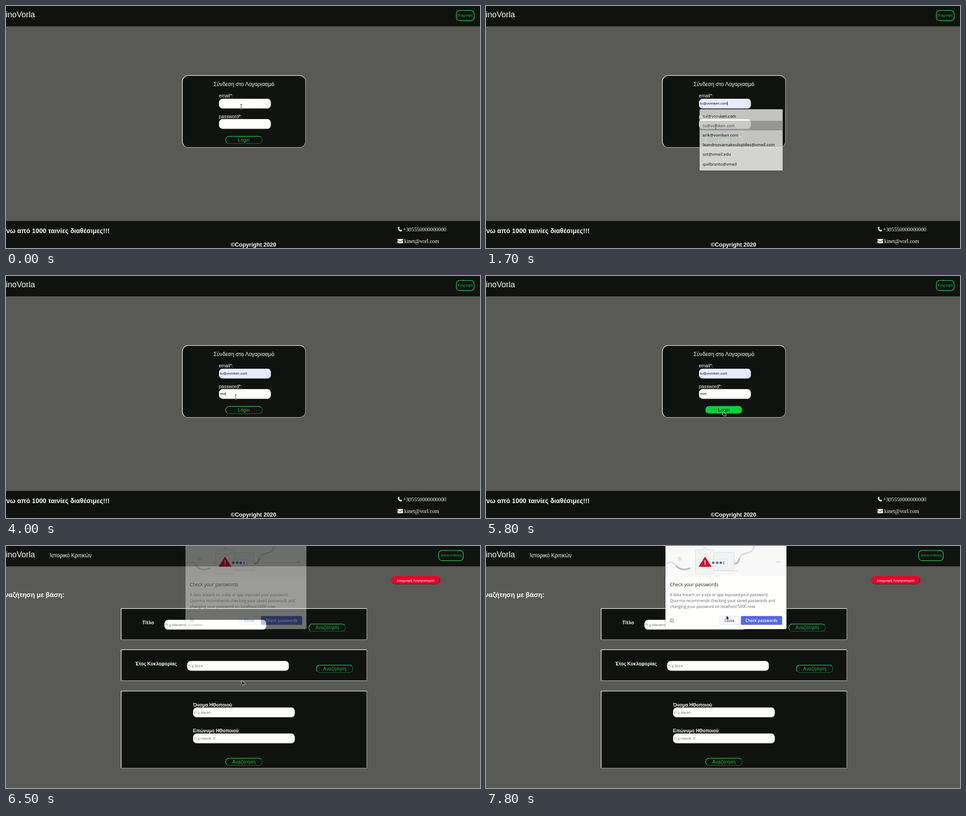
An HTML page for the animation above (8 s loop, 1046 by 535 pixels).

```html
<!DOCTYPE html>
<html lang="el">
<head>
<meta charset="utf-8">
<title>Login</title>
<style>
html, body { margin: 0; width: 100%; height: 100%; overflow: hidden; background: #595955; }
svg { display: block; width: 100%; height: 100%; }
text { font-family: "Liberation Sans", Arial, sans-serif; white-space: pre; }
.serif { font-family: "Liberation Serif", serif; }
.ui { font-family: "Open Sans", "Noto Sans", sans-serif; }
.bold { font-weight: 700; }
.semi { font-weight: 600; }
</style>
</head>
<body>
<svg id="stage" viewBox="0 0 1046 535"></svg>
<script>
const LOOP = 8000, STEP = 100;
const DARK = '#0f120f', PAPER = '#fffffc', PALE = '#fbfbf8', GREEN = '#20b545', SHADE = '#0d5a22';
const AUTO = '#e7edfb', GREY = '#a2a2a0';
const EMAIL = 'tu@vomken.com';
const ACCOUNTS = ['tul@vomken.com', EMAIL, 'erik@vomken.com',
  'leandrosvarnakoulopides@vmeil.com', 'ozt@vmeil.edu', 'quilbranto@vmeil'];

const text = (x, y, size, str, fill = PALE, cls = '', anchor = 'start') =>
  `<text x="${x}" y="${y}" font-size="${size}" fill="${fill}" class="${cls}" text-anchor="${anchor}">${str}</text>`;
const rect = (x, y, w, h, fill, extra = '') =>
  `<rect x="${x}" y="${y}" width="${w}" height="${h}" fill="${fill}" ${extra}/>`;
const line = (d, stroke, width, extra = '') =>
  `<path d="${d}" fill="none" stroke="${stroke}" stroke-width="${width}" ${extra}/>`;
const group = (id, body, extra = '') => `<g id="${id}" ${extra}>${body}</g>`;

// Rounded box with an outset border: light on top and left, dark on bottom and right
function outset(x, y, w, h, r, fill, light, dark, sw = 1.3) {
  const l = x + sw / 2, t = y + sw / 2, R = x + w - sw / 2, b = y + h - sw / 2;
  const k = r * (1 - Math.SQRT1_2);
  const arc = (px, py) => `A${r},${r} 0 0 1 ${px},${py}`;
  const upper = `M${l + k},${b - k}${arc(l, b - r)}V${t + r}${arc(l + r, t)}H${R - r}${arc(R - k, t + k)}`;
  const lower = `M${R - k},${t + k}${arc(R, t + r)}V${b - r}${arc(R - r, b)}H${l + r}${arc(l + k, b - k)}`;
  return rect(l, t, w - sw, h - sw, fill, `rx="${r}"`) + line(upper, light, sw) + line(lower, dark, sw);
}

const input = (x, y, w, fill = PAPER, hint = '') =>
  outset(x, y, w, 22, 7.5, fill, fill, GREY) + text(x + 2.4, y + 13.4, 7.95, hint, '#757575');
const button = (x, y, label, fill = DARK, ink = GREEN, edge = GREEN) =>
  outset(x, y, 82, 17.6, 7.5, fill, edge, SHADE, 1.5) + text(x + 41, y + 12.3, 10.65, label, ink, '', 'middle');
const navButton = (x, w, label) =>
  rect(x + .8, 9.8, w - 1.6, 22.6, DARK, `rx="7.5" stroke="${GREEN}" stroke-width="1.6"`) +
  text(x + w / 2, 23.3, 7.95, label, GREEN, '', 'middle');
const panel = (y, h) => outset(253.5, y, 543.5, h, 0, DARK, PALE, GREY);
const label = (x, y, str) => text(x, y, 10.25, str, PALE, 'bold');

function loginPage() {
  const icons =
    `<path d="M865.3,488.6l2-.5 1.3,3-1.3,1.2q1,2.1 3,3.1l1.3-1.4 2.1,1.5 -.4,2q-1.1,1.3-2.8,.9q-5-1.8-6-7.2q-.1-1.7,.8-2.6z" fill="${PALE}"/>` +
    rect(864, 515, 12, 9.6, PALE, 'rx="1"') + line('M864,517.6L870,521.6L876,517.6', DARK, .9);
  return navButton(993, 41, 'Εγγραφή') +
    rect(0, 475.3, 1046, 60, DARK) +
    text(228.5, 501.8, 14.3, 'Πάνω από 1000 ταινίες διαθέσιμες!!!', PALE, 'bold', 'end') +
    text(546, 532.2, 12.65, '©Copyright 2020', PALE, 'bold', 'middle') + icons +
    text(876, 498, 11.85, '+305550000000000', PALE, 'serif') +
    text(878.6, 524, 11.85, 'kinet@vorl.com', PALE, 'serif') +
    outset(388.6, 153, 273, 160.4, 13, DARK, PALE, GREY) +
    text(525, 177.2, 11.85, 'Σύνδεση στο Λογαριασμό', PALE, '', 'middle') +
    text(469.8, 202.3, 10.3, 'email*:') + text(469.8, 247.5, 10.3, 'password*:') +
    input(470, 205, 115) + group('filled', input(470, 205, 115, AUTO)) +
    text(472.4, 218.3, 7.97, '', '#111').replace('<text', '<text id="email"') +
    input(470, 250, 115) + group('dots', '') +
    group('idle', button(484, 287.5, 'Login')) +
    group('hover', button(484, 287.5, 'Login', '#0dcf40', DARK, '#0dcf40')) +
    rect(0, 0, .9, 9, '#222', 'id="caret"') + dropdown();
}

function dropdown() {
  const rows = ACCOUNTS.map((name, i) =>
    text(478, 246.8 + i * 21.15, 8.8, name, '#333', 'ui semi')).join('');
  return group('drop', rect(470.5, 227.5, 185, 137.5, '#000', 'opacity=".25" rx="2"') +
    rect(471.3, 228.2, 183.4, 135.6, '#f6f6f4', 'rx="1.5"') +
    rect(471.3, 0, 183.4, 21.2, '#bbbbb9', 'id="mark"') + rows);
}

function searchPage() {
  return text(97, 25.3, 11.85, 'Ιστορικό Κριτικών') + navButton(954, 56, 'Αποσύνδεση') +
    outset(849.6, 66.2, 108.6, 18.2, 8, '#e4062c', '#ea0a30', '#8d0a20') +
    text(904, 78.6, 7.95, 'Διαγραφή Λογαριασμού', PALE, '', 'middle') +
    text(129, 113, 14.5, 'Αναζήτηση με βάση:', PALE, 'bold', 'end') +
    panel(137.8, 70) + label(301, 172.6, 'Τίτλο') +
    input(349.7, 163.3, 225, PAPER, 'Π.χ Wardens: Duskfold') + button(667.6, 171.7, 'Αναζήτηση') +
    panel(228.8, 69.6) + label(284.4, 263.6, 'Έτος Κυκλοφορίας') +
    input(399.7, 254.2, 225, PAPER, 'Π.χ 2019') + button(684.3, 262.7, 'Αναζήτηση') +
    panel(320, 172) + label(412.8, 354.6, 'Όνομα ΗΘοποιού') +
    input(412.8, 357.1, 225, PAPER, 'Π.χ Martin') + label(412.8, 412.2, 'Επώνυμο ΗΘοποιού') +
    input(412.8, 414.6, 225, PAPER, 'Π.χ Halvek Jr.') + button(484, 468.4, 'Αναζήτηση') +
    group('dialog', dialog());
}

// Asterisk made of three crossing strokes
const star = (x, y, r, color, width) => [90, 30, 150].map(a => {
  const dx = r * Math.cos(a * Math.PI / 180), dy = r * Math.sin(a * Math.PI / 180);
  return line(`M${x - dx},${y - dy}L${x + dx},${y + dy}`, color, width);
}).join('');

function dialog() {
  const soft = '#dcdee0', blue = '#4048c4', body = '#5f6368';
  const art = rect(396, 0, 267, 68, '#f8f9f8') +
    line('M396,40C408,32 414,36 420,44S438,54 451,49', soft, 3.4) +
    line('M420,44C426,52 438,54 451,49', '#b9bdc0', 3.4) +
    line('M548,39C562,42 556,20 570,17S588,14 592,0', soft, 3.4) +
    line('M548,39C556,40 557,32 559,27', '#b9bdc0', 3.4) +
    star(427, 28.5, 6, soft, 2) +
    `<path d="M640,37.5q0-4 3-4 2-2.400 4,0 3,0 3,4z" fill="${soft}"/>` +
    rect(490, 14, 57.500, 39, '#f1f3f4', `rx="2" stroke="${soft}"`) + line('M503,55H556', soft, 1.3) +
    rect(462.5, 7.5, 40.5, 54.5, '#f4f5f5', `rx="3.500" stroke="${soft}"`) +
    rect(470, 10, 27, 7, '#fafafa', `rx="2" stroke="${soft}"`) +
    `<circle cx="483.400" cy="7.500" r="5" fill="#f4f5f5" stroke="${soft}"/><circle cx="483.400" cy="6.500" r="1.700" fill="${soft}"/>` +
    rect(491, 29.5, 40.5, 15, '#fdfdfd', `rx="1.500" stroke="${soft}"`) +
    [501.5, 510, 518].map(x => star(x, 37, 3.4, blue, 1.4)).join('') + line('M525,33.5V41', blue, 1.4) +
    '<path d="M483.400,23.500L498,46H469z" fill="#d80a2c"/>' +
    line('M483.400,31.500V39', '#fff', 1.8) + rect(482.5, 40.4, 1.8, 1.8, '#fff');
  return rect(394.5, -4, 270, 189.5, '#000', 'opacity=".16" rx="3"') +
    rect(396, -4, 267, 187.8, '#fffffd', 'rx="2"') + art +
    text(405.8, 88.7, 10.25, 'Check your passwords', '#202124', 'ui') +
    ['A data breach on a site or app exposed your password.',
      'Quorma recommends checking your saved passwords and',
      'changing your password on localhost:5000 now.']
      .map((s, i) => text(405.8, 111.2 + i * 13, 8.53, s, body, 'ui')).join('') +
    `<circle cx="410.500" cy="164.500" r="3.800" fill="none" stroke="${body}"/>` +
    line('M410.5,163.8V166.800M410.5,162V163', body, 1) +
    rect(516, 155.2, 42, 18.6, '#fffffd', `rx="2" stroke="${soft}"`) +
    text(537, 167.6, 8.6, 'Close', blue, 'ui semi', 'middle') +
    rect(562.5, 154.8, 91, 19.4, '#5569e0', 'rx="2"') +
    text(608, 167.6, 8.5, 'Check passwords', '#fff', 'ui semi', 'middle');
}

function pointers() {
  const shape = (id, d) => `<path id="${id}" d="${d}" fill="#111" stroke="#f4f4f4" stroke-width=".9" stroke-linejoin="round"/>`;
  const bar = 'M-2.200,-4.800Q0,-4.800 0,-3.600Q0,-4.800 2.200,-4.800M0,-3.800V4.800M-2.200,5.600Q0,5.600 0,4.500Q0,5.600 2.200,5.600';
  return group('cursor',
    group('beam', line(bar, '#ddd', 1.8, 'opacity=".5"') + line(bar, '#333', .9)) +
    shape('arrow', 'M.4,.4V10.300L2.600,8.200L4.100,11.700L5.600,11L4.100,7.600H7.300z') +
    shape('hand', 'M-.2,1.400Q-.2,.4 .9,.4Q2,.4 2,1.400V4L5.600,4.700Q7.300,5 7.200,6.500L6.500,10.300H1.700L-2.200,6.700Q-1.500,5.300 -.2,6.200z'));
}

const stage = document.getElementById('stage');
stage.innerHTML = rect(0, 0, 1046, 535, '#595955') + rect(0, 0, 1046, 45, DARK) +
  text(64, 25, 17.8, 'KinoVorla', PALE, '', 'end') +
  group('login', loginPage()) + group('search', searchPage()) + pointers();

const $ = id => document.getElementById(id);
const show = (id, on) => $(id).setAttribute('display', on ? 'inline' : 'none');
const set = (id, attrs) => { for (const k in attrs) $(id).setAttribute(k, attrs[k]); };
const within = (t, a, b) => t >= a && t < b;

const PATH = [[0, 519, 222], [900, 519, 222], [1000, 514, 240], [1200, 507, 267], [5300, 507, 267],
  [5400, 508, 272], [5600, 516, 289], [5800, 523, 299], [6400, 523, 299], [6700, 514.5, 291],
  [6900, 330, 215], [7100, 132, 150], [7300, 446, 131], [7600, 531, 154], [7700, 531, 154], [7800, 530, 153]];
const KEYS = [3000, 3400, 3700, 4000, 4900];
const KINDS = [[0, 'beam'], [1000, 'arrow'], [1700, 'beam'], [5500, 'arrow'], [5600, 'hand'],
  [6000, 'arrow'], [6200, 'hand'], [6800, 'arrow']];

function place(t) {
  const i = PATH.findIndex(p => p[0] > t);
  if (i < 0) return PATH[PATH.length - 1].slice(1);
  const [t0, x0, y0] = PATH[i - 1], [t1, x1, y1] = PATH[i];
  const f = (t - t0) / (t1 - t0);
  return [x0 + (x1 - x0) * f, y0 + (y1 - y0) * f];
}

function draw(t) {
  show('login', t < 6000);
  show('search', t >= 6000);

  set('drop', { opacity: within(t, 600, 1700) ? 1 : within(t, 1700, 1800) ? .78 : within(t, 1800, 1900) ? .4 : 0 });
  show('mark', t >= 1000);
  set('mark', { y: t < 1100 ? 232.7 : 253.8 });
  show('filled', t >= 1000);
  $('email').textContent = t < 1000 ? '' : t < 1100 ? ACCOUNTS[0] : EMAIL;

  const typed = KEYS.filter(k => t >= k).length;
  $('dots').innerHTML = KEYS.slice(0, typed).map((_, i) =>
    `<circle cx="${474 + i * 2.85}" cy="260.700" r="1.150" fill="#111"/>`).join('');

  const inEmail = within(t, 600, 1000) || within(t, 1700, 2200);
  const inPassword = within(t, 2200, 2800) || within(t, 3000, 4600) || within(t, 4900, 5400);
  show('caret', inEmail || inPassword);
  set('caret', inEmail ? { x: t < 1700 ? 472.2 : 532.2, y: 211 } : { x: 472.2 + typed * 2.88, y: 256.2 });

  const over = t >= 5600;
  show('idle', !over);
  show('hover', over);
  set('dialog', { opacity: t < 6500 ? 0 : Math.min(1, .4 + (t - 6500) / 200) });

  const kind = KINDS.filter(k => t >= k[0]).pop()[1];
  for (const id of ['beam', 'arrow', 'hand']) show(id, id === kind);
  set('cursor', { transform: `translate(${place(t)})` });
}

const start = performance.now();
function tick() {
  const t = (performance.now() - start) % LOOP;
  draw(Math.floor(t / STEP) * STEP);
  requestAnimationFrame(tick);
}
tick();
</script>
</body>
</html>
```
